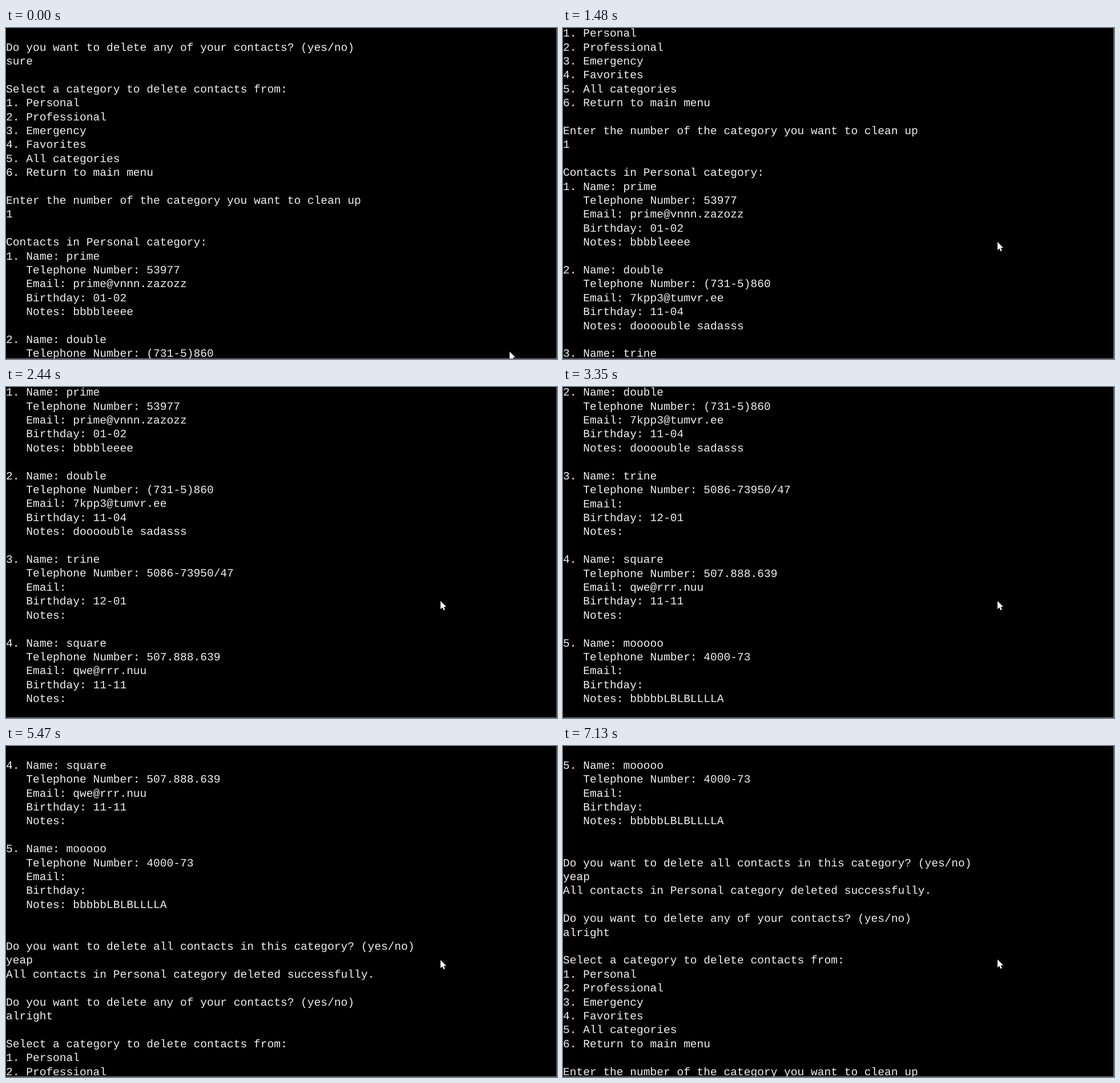
Recreate the animation shown at these times as an HTML page. Size 965 by 580 pixels, loop 8000 ms.

```html
<!DOCTYPE html>
<html lang="en">
<head>
<meta charset="utf-8">
<title>Contact book console</title>
<style>
  html, body { margin: 0; width: 100%; height: 100%; overflow: hidden; background: #000; }
  #screen {
    position: relative; box-sizing: border-box; width: 965px; height: 580px; overflow: hidden;
    background: #000; border: solid #808080; border-width: 0 1px 1px 0;
  }
  #log {
    position: absolute; left: 0; margin: 0; color: #f0f0f0;
    font: 19.56px/24.4px "Liberation Mono", monospace; text-rendering: geometricPrecision;
  }
  #pointer { position: absolute; left: 0; top: 0; fill: #fff; }
</style>
</head>
<body>
<div id="screen">
  <pre id="log"></pre>
  <svg id="pointer" width="12" height="18"><path d="M0 0V14.2L3.3 11.2 5.4 16.3 7.8 15.3 5.7 10.3H10.2Z"/></svg>
</div>
<script>
const LOOP = 8000, LINE = 24.4, TOP = -1.9;
const log = document.getElementById('log');
const pointer = document.getElementById('pointer');

const question = 'Do you want to delete any of your contacts? (yes/no)';
const menu = `Select a category to delete contacts from:
1. Personal
2. Professional
3. Emergency
4. Favorites
5. All categories
6. Return to main menu

Enter the number of the category you want to clean up`;

const contacts = [
  ['prime', '53977', 'prime@vnnn.zazozz', '01-02', 'bbbbleeee'],
  ['double', '(731-5)860', '7kpp3@tumvr.ee', '11-04', 'doooouble sadasss'],
  ['trine', '5086-73950/47', '', '12-01', ''],
  ['square', '507.888.639', 'qwe@rrr.nuu', '11-11', ''],
  ['mooooo', '4000-73', '', '', 'bbbbbLBLBLLLLA'],
];
const card = ([name, phone, email, birthday, notes], i) => `${i + 1}. Name: ${name}
   Telephone Number: ${phone}
   Email: ${email}
   Birthday: ${birthday}
   Notes: ${notes}
`;

log.textContent = [
  ' ', question, 'sure', '', menu, '1', '',
  'Contacts in Personal category:', ...contacts.map(card), '',
  'Do you want to delete all contacts in this category? (yes/no)', 'yeap',
  'All contacts in Personal category deleted successfully.', '',
  question, 'alright', '', menu,
].join('\n');

// [start ms, top line]
const scrolls = [[0, 0], [1480, 5], [1890, 11], [2440, 16], [3350, 22], [4200, 28], [5470, 33], [7020, 39]];
// [start ms, x, y]
const moves = [
  [0, 882, 567], [20, 872, 549], [60, 838, 492], [110, 796, 428], [150, 766, 385],
  [200, 751, 364], [240, 754, 367], [280, 761, 375], [7130, 761, 374],
];
const current = (steps, t) => steps.findLast(([start]) => start <= t);

function draw() {
  const t = performance.now() % LOOP;
  const [, line] = current(scrolls, t);
  const [, x, y] = current(moves, t);
  log.style.top = `${TOP - line * LINE}px`;
  pointer.style.transform = `translate(${x}px, ${y}px)`;
  requestAnimationFrame(draw);
}
draw();
</script>
</body>
</html>
```
